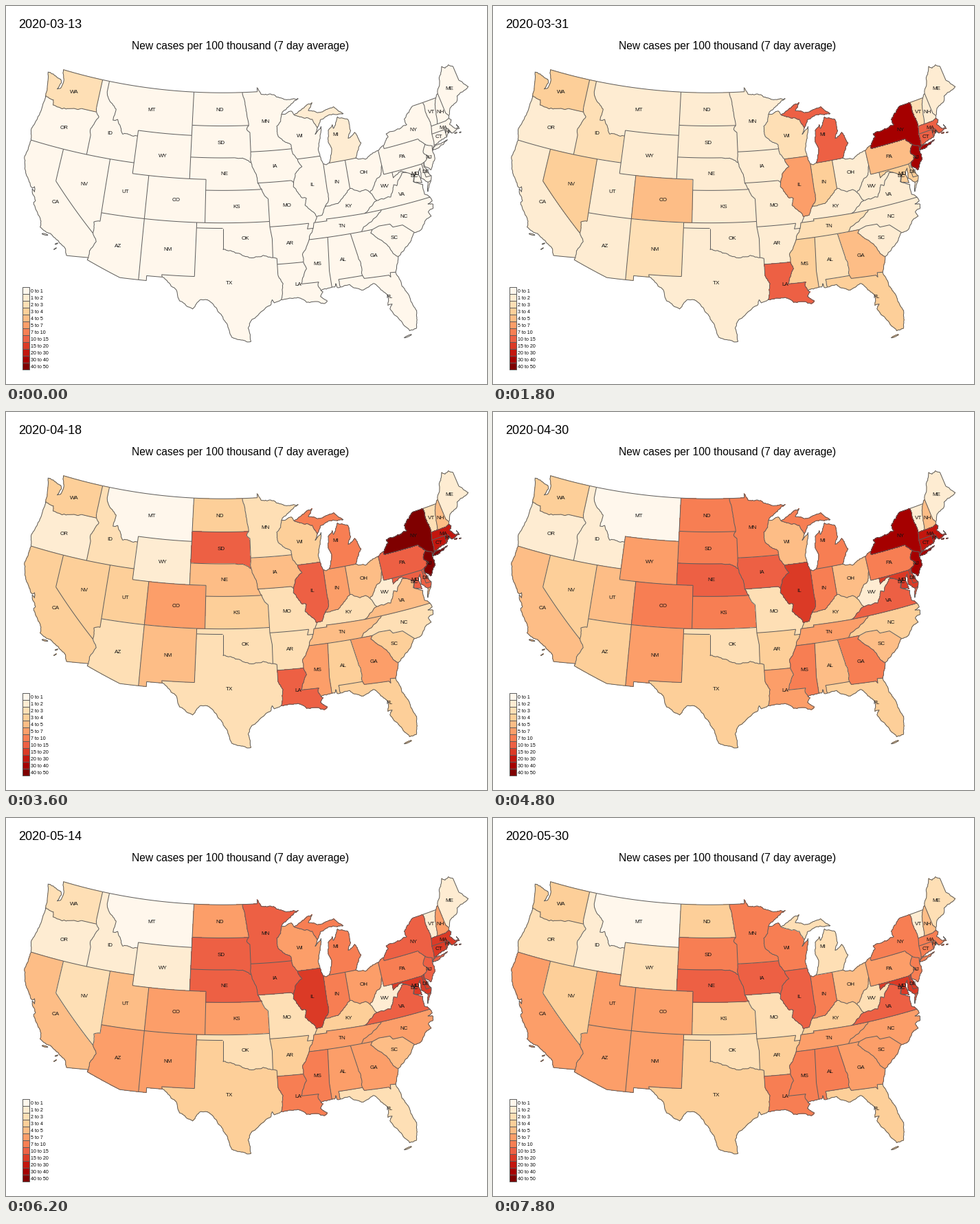
Write a matplotlib script that moves like this. It is 700 by 550 pixels and loops after 8 s.

```python
import numpy as np
import matplotlib.pyplot as plt
from matplotlib.animation import FuncAnimation
from matplotlib.collections import LineCollection
from matplotlib.patches import PathPatch, Rectangle
from matplotlib.path import Path

W, H, DPI = 700, 550, 100
FRAMES, STEP_MS, DAYS_PER_FRAME = 40, 200, 2
START = np.datetime64("2020-03-13")
KEY_DAYS = [0, 18, 26, 36, 48, 62, 78]
BREAKS = [0, 1, 2, 3, 4, 5, 7, 10, 15, 20, 30, 40, 50]
RAMP = ["#fff7ec", "#fee8c8", "#fdd49e", "#fdbb84", "#fc8d59",
        "#ef6548", "#d7301f", "#b30000", "#7f0000"]
GREY, THIN = "#5e5e5e", 0.72

plt.rcParams["font.family"] = "Liberation Sans"
rng = np.random.default_rng(4)
borders, courses = [], {}


def make_palette(n):
    rgb = np.array([[int(c[i:i + 2], 16) / 255 for i in (1, 3, 5)] for c in RAMP])
    pos = np.linspace(0, len(RAMP) - 1, n)
    return np.column_stack([np.interp(pos, range(len(RAMP)), ch) for ch in rgb.T])


def project(pts):
    """Lambert azimuthal equal-area, centred on 45N 100W, in stage pixels."""
    lam = np.radians(100 - pts[:, 0])
    phi = np.radians(pts[:, 1])
    s = np.sqrt(0.5)
    up = s * np.sin(phi)
    out = s * np.cos(phi) * np.cos(lam)
    k = 6371 / 7.04 * np.sqrt(2 / (1 + up + out))
    return np.column_stack([315.5 + k * np.cos(phi) * np.sin(lam),
                            189.4 - k * (up - out)])


def smooth(a, b):
    n = max(1, int(np.hypot(*(b - a)) / 0.5))
    return [a + (b - a) * t / n for t in range(n)]


def rough(a, b):
    """Midpoint displacement: a natural line from a up to, not including, b."""
    d = b - a
    size = np.hypot(*d)
    if size < 0.2:
        return [a]
    shift = rng.uniform(-0.12, 0.12) * min(size, 0.6) / size
    mid = (a + b) / 2 + shift * np.array([-d[1], d[0]])
    return rough(a, mid) + rough(mid, b)


def border(owners, degrees, step):
    pts = np.reshape(degrees, (-1, 2)).astype(float)
    out = [p for a, b in zip(pts, pts[1:]) for p in step(a, b)] + [pts[-1]]
    borders.append((owners.split(), project(np.array(out))))


def line(owners, *west_north):
    border(owners, west_north, smooth)


def wild(owners, *west_north):
    border(owners, west_north, rough)


def parallel(lat, *stops):
    for a, owners, b in zip(stops[::2], stops[1::2], stops[2::2]):
        line(owners, a, lat, b, lat)


def meridian(lon, *stops):
    for a, owners, b in zip(stops[::2], stops[1::2], stops[2::2]):
        line(owners, lon, a, lon, b)


def islet(owner, lon, lat, rx, ry, tilt=0):
    t = np.linspace(0, 2 * np.pi, 8)
    x, y = rx * np.cos(t), ry * np.sin(t)
    line(owner, *np.column_stack([lon + x, lat + y + tilt * x]).ravel())


def gap(a, b):
    return np.hypot(*(a - b))


def rings(name):
    """Join a state's border lines end to end into closed outlines."""
    todo = [p for owners, p in borders if name in owners]
    done = []
    while todo:
        ring = todo.pop(0)
        while todo and gap(ring[0], ring[-1]) > 1e-6:
            end = ring[-1]
            i = min(range(len(todo)), key=lambda j: min(
                gap(todo[j][0], end), gap(todo[j][-1], end)))
            nxt = todo.pop(i)
            if gap(nxt[-1], end) < gap(nxt[0], end):
                nxt = nxt[::-1]
            ring = np.vstack([ring, nxt[1:]])
        done.append(ring)
    return done


def centroid(outlines):
    total, moment = 0, np.zeros(2)
    for p in outlines:
        q = np.roll(p, -1, axis=0)
        cross = p[:, 0] * q[:, 1] - q[:, 0] * p[:, 1]
        sign = np.sign(cross.sum())
        total += sign * cross.sum() / 2
        moment += sign * ((p + q) * cross[:, None]).sum(axis=0) / 6
    return moment / total


def course(names, *levels):
    """States that share one colour class on each key day after the first."""
    for name in names.split():
        courses[name] = [{"WA": 2, "MI": 1}.get(name, 0), *levels]


# Surveyed borders
parallel(49, 122.76, "WA", 117.03, "ID", 116.05, "MT", 104.05, "ND", 97.23, "MN", 95.15)
parallel(46, 118.98, "WA OR", 116.92)
parallel(45.94, 104.05, "ND SD", 96.56)
parallel(45, 111.05, "MT WY", 104.05)
parallel(45.01, 74.7, "NY", 73.34, "VT", 71.5)
parallel(43.5, 96.45, "MN IA", 91.22)
parallel(43, 104.05, "SD NE", 98.5)
parallel(42.73, 73.26, "MA VT", 72.46, "MA NH", 71.3)
parallel(42.5, 90.64, "IL WI", 87.8)
parallel(42.03, 73.5, "CT MA", 71.8, "RI MA", 71.38)
parallel(42, 124.2, "OR CA", 120, "OR NV", 117.03, "ID NV", 114.05, "ID UT", 111.05)
parallel(42, 79.76, "PA NY", 75.35)
parallel(41.74, 87.53, "IN", 87.5)
parallel(41.74, 86.82, "IN MI", 84.8, "OH MI", 83.45)
parallel(41, 111.05, "WY UT", 109.05, "WY CO", 104.05, "CO NE", 102.05)
parallel(40.6, 95.77, "IA MO", 91.73)
parallel(40, 102.05, "NE KS", 95.31)
parallel(39.72, 80.52, "PA WV", 79.48, "PA MD", 75.79)
parallel(37, 114.05, "UT AZ", 109.05, "NM CO", 103, "CO OK", 102.05, "KS OK", 94.62)
parallel(36.6, 83.68, "TN VA", 81.68, "NC VA", 75.87)
parallel(36.5, 103, "OK TX", 100)
parallel(36.5, 94.62, "MO AR", 90.15)
parallel(35, 90.3, "MS TN", 88.2, "AL TN", 85.61, "GA TN", 84.32, "GA NC", 83.11)
parallel(33, 94.04, "AR LA", 91.17)
parallel(32, 106.6, "NM TX", 103.06)
parallel(31, 91.62, "LA MS", 89.73)
parallel(31, 87.6, "AL FL", 85)

meridian(120, 42, "NV CA", 39)
meridian(117.03, 49, "WA ID", 46.42)
meridian(117.03, 43.8, "OR ID", 42)
meridian(116.05, 49, "ID MT", 48)
meridian(114.05, 42, "UT NV", 37, "NV AZ", 36.2)
meridian(111.05, 41, "WY UT", 42, "ID WY", 44.47, "MT WY", 45)
meridian(109.05, 31.33, "AZ NM", 37, "UT CO", 41)
meridian(104.05, 41, "WY NE", 43, "SD WY", 45, "MT SD", 45.94, "MT ND", 49)
meridian(103, 36.5, "NM OK", 37)
meridian(102.05, 37, "CO KS", 40, "CO NE", 41)
meridian(100, 36.5, "OK TX", 34.56)
meridian(96.45, 45.3, "SD MN", 43.5)
meridian(95.15, 49, "MN", 49.38)
meridian(94.62, 39.1, "KS MO", 37, "OK MO", 36.5)
meridian(94.04, 33.55, "TX AR", 33, "TX LA", 31.99)
meridian(87.53, 41.74, "IN IL", 39.35)
meridian(80.52, 41.98, "OH PA", 40.64, "PA WV", 39.72)
meridian(79.76, 42, "PA NY", 42.27)
line("NV CA", 120, 39, 114.63, 35)
line("AZ", 114.72, 32.72, 114.81, 32.5, 111.07, 31.33, 109.05, 31.33)
line("NM", 109.05, 31.33, 108.21, 31.33, 108.21, 31.78, 106.53, 31.78)
line("NM TX", 106.53, 31.78, 106.6, 32)
line("NM TX", 103.06, 32, 103, 36.5)
line("OK AR", 94.62, 36.5, 94.43, 35.39, 94.48, 33.64)
line("MO AR", 89.7, 36, 90.37, 36, 90.15, 36.5)
line("MS AL", 88.4, 30.37, 88.47, 31.9, 88.2, 35)
line("AL GA", 85.61, 35, 85.18, 32.87)
line("GA FL", 85, 31, 84.86, 30.71, 82.2, 30.57, 82.05, 30.36, 82.02, 30.78, 81.44, 30.71)
line("TN KY", 83.68, 36.6, 88.07, 36.68, 88.05, 36.5, 89.42, 36.5)
line("MO TN", 89.42, 36.5, 89.55, 36.5, 89.7, 36)
line("SC NC", 83.11, 35, 82.3, 35.2, 81.04, 35.15, 80.78, 34.82, 79.67, 34.8, 78.55, 33.86)
line("IN OH", 84.82, 39.1, 84.8, 41.74)
line("DE MD", 75.79, 39.72, 75.7, 38.46, 75.05, 38.45)
line("MD DC", 77.04, 38.79, 76.91, 38.89, 77.04, 38.99, 77.12, 38.93)
line("DC VA", 77.04, 38.79, 77.12, 38.93)
line("MD VA", 75.25, 38.03, 75.65, 37.95)
line("NY MA", 73.26, 42.73, 73.5, 42.03)
line("NY CT", 73.5, 42.03, 73.55, 41.3, 73.65, 41)
line("CT RI", 71.8, 42.03, 71.85, 41.32)
line("NH ME", 71.08, 45.3, 70.98, 43.4, 70.7, 43.07)

# Rivers and ridges
wild("WA OR", 124.05, 46.27, 122.9, 46.1, 122.75, 45.65, 121.2, 45.65, 118.98, 46)
wild("WA ID", 116.92, 46, 117.03, 46.42)
wild("OR ID", 116.92, 46, 116.46, 45.6, 117.2, 44.4, 117.03, 43.8)
wild("ID MT", 111.05, 44.47, 113, 44.45, 113.95, 45.7, 114.55, 45.56, 114.4, 46.6,
     115.7, 47.45, 116.05, 48)
wild("CA AZ", 114.63, 35, 114.14, 34.3, 114.72, 33.35, 114.72, 32.72)
wild("NV AZ", 114.05, 36.2, 114.74, 36.05, 114.63, 35)
wild("ND MN", 96.56, 45.94, 96.85, 47.5, 97.23, 49)
wild("SD MN", 96.56, 45.94, 96.85, 45.6, 96.45, 45.3)
wild("SD IA", 96.45, 43.5, 96.45, 42.49)
wild("SD NE", 96.45, 42.49, 97.2, 42.85, 98.5, 43)
wild("KS MO", 95.31, 40, 95.1, 39.55, 94.62, 39.1)
wild("OK TX", 100, 34.56, 98.1, 34.13, 97.1, 33.75, 95.5, 33.9, 94.48, 33.64)
wild("TX AR", 94.48, 33.64, 94.04, 33.55)
wild("TX LA", 94.04, 31.99, 93.55, 31.18, 93.85, 29.7)
wild("MN WI", 92.1, 46.75, 92.3, 46.1, 92.87, 45.7, 92.8, 44.75, 91.25, 43.85, 91.22, 43.5)
wild("IA WI", 91.22, 43.5, 91.15, 43, 90.64, 42.5)
wild("IA IL", 90.64, 42.5, 90.2, 41.75, 91.1, 41.2, 91.42, 40.38)
wild("IA MO", 91.42, 40.38, 91.73, 40.6)
wild("IA NE", 95.77, 40.6, 95.85, 41.2, 96.45, 42.49)
wild("NE MO", 95.77, 40.6, 95.31, 40)
wild("MO IL", 91.42, 40.38, 91.5, 40, 90.6, 38.9, 90.1, 38.8, 90.35, 38.2, 89.5, 37.5,
     89.15, 37)
wild("MO KY", 89.15, 37, 89.42, 36.5)
wild("AR TN", 89.7, 36, 90.3, 35)
wild("AR MS", 90.3, 35, 91.2, 33.7, 91.17, 33)
wild("LA MS", 91.17, 33, 90.9, 32.35, 91.62, 31)
wild("LA MS", 89.73, 31, 89.85, 30.7, 89.6, 30.2)
wild("WI MI", 87.6, 45.1, 88.1, 45.95, 90.42, 46.57)
wild("IN IL", 88.05, 37.8, 87.5, 38.5, 87.53, 39.35)
wild("OH WV", 80.52, 40.64, 80.85, 39.75, 81.75, 39.2, 82.2, 38.6, 82.59, 38.42)
wild("KY VA", 83.68, 36.6, 81.97, 37.54)
wild("KY WV", 81.97, 37.54, 82.59, 38.42)
wild("KY OH", 82.59, 38.42, 83, 38.73, 83.7, 38.63, 84.82, 39.1)
wild("KY IN", 84.82, 39.1, 85.4, 38.7, 86.5, 37.93, 88.05, 37.8)
wild("KY IL", 88.05, 37.8, 88.5, 37.1, 89.15, 37)
wild("AL GA", 85.18, 32.87, 85, 32.3, 85, 31)
wild("AL FL", 87.6, 31, 87.5, 30.28)
wild("GA SC", 83.11, 35, 83.35, 34.7, 81.95, 33.5, 80.87, 32.03)
wild("NC TN", 84.32, 35, 84, 35.4, 82.6, 36, 81.68, 36.6)
wild("WV MD", 79.48, 39.72, 79.49, 39.2, 78.4, 39.62, 77.72, 39.32)
wild("WV VA", 77.72, 39.32, 78.35, 39.45, 79.3, 38.42, 79.65, 38.58, 80.3, 37.55, 81.97, 37.54)
wild("MD VA", 77.12, 38.93, 77.72, 39.32)
wild("PA DE", 75.79, 39.72, 75.42, 39.81)
wild("PA NJ", 75.42, 39.81, 74.73, 40.2, 75.2, 40.65, 74.7, 41.36)
wild("PA NY", 74.7, 41.36, 75.35, 42)
wild("NY NJ", 74.7, 41.36, 73.9, 41, 74.02, 40.7)
wild("NY VT", 73.34, 45.01, 73.4, 44.1, 73.26, 42.73)
wild("VT NH", 72.46, 42.73, 72.05, 44.1, 71.5, 45.01)
wild("RI MA", 71.38, 42.03, 71.12, 41.5)
wild("MA NH", 71.3, 42.73, 70.82, 42.87)
wild("NH", 71.5, 45.01, 71.08, 45.3)

# Coasts
wild("WA", 122.76, 49, 122.25, 47.9, 122.4, 47.3, 122.8, 47.15, 122.5, 47.8, 122.75, 48.1,
     124.72, 48.38, 124.15, 46.95, 124.05, 46.27)
wild("OR", 124.05, 46.27, 124.07, 44.7, 124.55, 42.84, 124.2, 42)
wild("CA", 124.2, 42, 124.4, 40.4, 123.7, 38.95, 122.5, 37.83, 122.3, 38, 122.15, 37.55,
     122.5, 37.75, 121.8, 36.8, 121.95, 36.6, 120.65, 35.1, 120.6, 34.55, 119.3, 34.2,
     118.4, 33.75, 117.35, 33.1, 117.12, 32.53)
line("CA", 117.12, 32.53, 114.72, 32.72)
islet("CA", 119.9, 34, 0.35, 0.06)
islet("CA", 118.45, 33.4, 0.15, 0.04, -0.5)
islet("CA", 118.48, 32.93, 0.13, 0.03, -0.8)
wild("TX", 93.85, 29.7, 94.6, 29.45, 94.8, 29.75, 94.95, 29.3, 97, 28, 97.4, 27.2,
     97.15, 25.96, 99.1, 26.4, 99.5, 27.5, 100.65, 29.1, 101.4, 29.77, 102.3, 29.88,
     103.15, 28.98, 104.5, 29.65, 104.9, 30.6, 106.53, 31.78)
wild("LA", 93.85, 29.7, 91.85, 29.7, 91.2, 29.25, 90, 29.2, 89.4, 28.95, 89.05, 29.15,
     89.7, 29.65, 89.4, 30.05, 89.6, 30.2)
wild("MS", 89.6, 30.2, 88.4, 30.37)
wild("AL", 88.4, 30.37, 88.1, 30.35, 87.95, 30.65, 87.8, 30.25, 87.5, 30.28)
wild("FL", 81.44, 30.71, 81.05, 29.3, 80.55, 28.45, 80.03, 26.8, 80.4, 25.2, 81.1, 25.13,
     82.7, 27.5, 82.4, 27.9, 82.85, 27.85, 82.65, 28.7, 84, 30.1, 85.3, 29.68, 86.5, 30.38,
     87.5, 30.28)
islet("FL", 81.35, 24.67, 0.4, 0.06, -0.2)
wild("GA", 80.87, 32.03, 81.44, 30.71)
wild("SC", 78.55, 33.86, 79.2, 33.15, 80.87, 32.03)
wild("NC", 75.87, 36.6, 75.75, 36.2, 76.3, 36.05, 75.75, 35.9, 75.85, 35.55, 76.5, 35.35,
     76.3, 34.9, 77.1, 34.63, 77.9, 33.9, 78.55, 33.86)
wild("VA", 77.04, 38.79, 77.3, 38.4, 76.3, 37.9, 76.4, 37, 75.87, 36.6)
wild("VA", 75.25, 38.03, 75.95, 37.15, 75.65, 37.95)
wild("MD", 75.05, 38.45, 75.25, 38.03)
wild("MD", 75.65, 37.95, 76.3, 38.5, 76.1, 39.4, 76.5, 38.9, 76.35, 38.07, 77.25, 38.4,
     77.04, 38.79)
wild("DE", 75.42, 39.81, 75.6, 39.45, 75.05, 38.45)
wild("NJ", 74.02, 40.7, 74.1, 39.75, 74.9, 38.95, 75.52, 39.5, 75.42, 39.81)
wild("NY", 73.65, 41, 74.02, 40.7)
wild("NY", 74, 40.6, 73.75, 40.85, 71.9, 41.07, 73.3, 40.63, 74, 40.6)
wild("CT", 71.85, 41.32, 73.65, 41)
wild("RI", 71.85, 41.32, 71.4, 41.75, 71.12, 41.5)
wild("MA", 71.12, 41.5, 70, 41.65, 70.2, 42.07, 70.05, 41.8, 70.5, 41.78, 71, 42.3,
     70.6, 42.65, 70.82, 42.87)
islet("MA", 70.62, 41.39, 0.17, 0.05)
islet("MA", 70.08, 41.29, 0.12, 0.04)
wild("NH", 70.7, 43.07, 70.82, 42.87)
wild("ME", 71.08, 45.3, 70.3, 46.2, 70, 46.7, 69.23, 47.46, 68.9, 47.2, 68.3, 47.36,
     67.79, 47.07)
line("ME", 67.79, 47.07, 67.79, 45.7)
wild("ME", 67.79, 45.7, 66.97, 44.83, 68.8, 44.45, 69.1, 44, 70.25, 43.65, 70.7, 43.07)

# Great Lakes
wild("MN", 95.15, 49.38, 94.65, 48.75, 92.95, 48.62, 91.4, 48.07, 89.6, 48, 91.3, 47.25,
     92.1, 46.75)
wild("WI", 87.8, 42.5, 87.9, 43.1, 87.1, 45.15, 88, 44.55, 87.6, 45.1)
wild("WI", 90.42, 46.57, 90.75, 46.95, 92.1, 46.75)
wild("MI", 90.42, 46.57, 88.4, 47.37, 87.8, 47.45, 88.45, 46.8, 87.35, 46.5, 85, 46.75,
     83.9, 45.97, 85.5, 46.07, 87, 45.8, 87.6, 45.1)
wild("MI", 86.82, 41.74, 86.2, 43, 86.5, 43.65, 86.25, 44.7, 85.6, 45.15, 85.55, 44.8,
     85, 45.4, 84.75, 45.78, 83.45, 45.35, 83.4, 44.3, 83.9, 43.65, 82.95, 44.07,
     82.42, 43, 83.45, 41.74)
wild("IL", 87.53, 41.74, 87.8, 42.5)
wild("IN", 86.82, 41.74, 87.2, 41.62, 87.5, 41.74)
wild("OH", 83.45, 41.74, 82.3, 41.45, 80.52, 41.98)
wild("PA", 79.76, 42.27, 80.52, 41.98)
wild("NY", 79.76, 42.27, 78.9, 42.95, 79.05, 43.26, 76.2, 43.55, 76.3, 44.1, 74.7, 45.01)

course("OR ME WV", 1, 1, 1, 1, 1, 2)
course("MT", 1, 1, 0, 0, 0, 0)
course("ID VT", 2, 5, 2, 1, 1, 1)
course("WY", 1, 2, 1, 5, 1, 2)
course("KS ND", 1, 2, 3, 6, 5, 3)
course("OK MO", 1, 3, 2, 2, 2, 2)
course("TX KY AR", 1, 2, 2, 3, 3, 3)
course("CA UT SC", 1, 3, 3, 4, 4, 5)
course("AZ NC", 1, 2, 2, 3, 5, 5)
course("WA NV FL", 3, 4, 3, 3, 2, 3)
course("CO GA", 4, 5, 5, 6, 5, 5)
course("NM TN", 2, 3, 4, 5, 5, 5)
course("OH NH", 1, 3, 4, 4, 5, 4)
course("AL WI", 2, 3, 3, 4, 5, 6)
course("MS IN", 3, 5, 5, 6, 6, 6)
course("SD", 1, 4, 7, 6, 7, 6)
course("IA NE VA", 1, 2, 4, 7, 7, 7)
course("MN", 1, 1, 2, 6, 7, 6)
course("PA", 4, 7, 7, 6, 6, 5)
course("IL", 5, 6, 7, 8, 8, 7)
course("MI", 7, 7, 6, 6, 6, 2)
course("LA", 7, 10, 7, 5, 6, 6)
course("NY NJ", 10, 11, 11, 10, 7, 6)
course("MA CT RI", 7, 8, 9, 9, 8, 6)
course("MD DC DE", 3, 6, 7, 8, 8, 8)

fig = plt.figure(figsize=(W / DPI, H / DPI), dpi=DPI, facecolor="white")
ax = fig.add_axes([0, 0, 1, 1])
ax.set(xlim=(0, W), ylim=(H, 0))
ax.axis("off")
palette = make_palette(len(BREAKS) - 1)


def label(x, y, text, px, ha="left", color="black"):
    return ax.text(x, y, text, fontsize=px * 72 / DPI, ha=ha, color=color,
                   va="center_baseline", zorder=5)


date = label(18.5, 25, str(START), 18)
label(341.5, 57, "New cases per 100 thousand (7 day average)", 15.6, "center")

for i, (low, high) in enumerate(zip(BREAKS, BREAKS[1:])):
    top = 408.5 + i * 10.08
    ax.add_patch(Rectangle((23.5, top), 10, 10.08, facecolor=palette[i],
                           edgecolor=GREY, linewidth=THIN))
    label(36, top + 5.6, f"{low} to {high}", 7.2)

shapes = []
for name, levels in courses.items():
    outlines = rings(name)
    path = Path.make_compound_path(*[Path(r, closed=True) for r in outlines])
    patch = PathPatch(path, edgecolor="none", antialiased=False)
    shapes.append((ax.add_patch(patch), levels))
    label(*centroid(outlines), name, 8, "center", "#111111")
ax.add_collection(LineCollection([p for _, p in borders], colors=GREY,
                                 linewidths=THIN, zorder=3))


def update(i):
    day = i * DAYS_PER_FRAME
    date.set_text(str(START + day))
    # The first wave starts slowly and then speeds up
    if day < KEY_DAYS[1]:
        day = KEY_DAYS[1] * (day / KEY_DAYS[1]) ** 1.5
    for patch, levels in shapes:
        patch.set_facecolor(palette[int(np.interp(day, KEY_DAYS, levels) + 0.5)])
    return [date] + [p for p, _ in shapes]


anim = FuncAnimation(fig, update, frames=FRAMES, interval=STEP_MS, repeat=True,
                     repeat_delay=0, blit=False)
plt.show()
```
